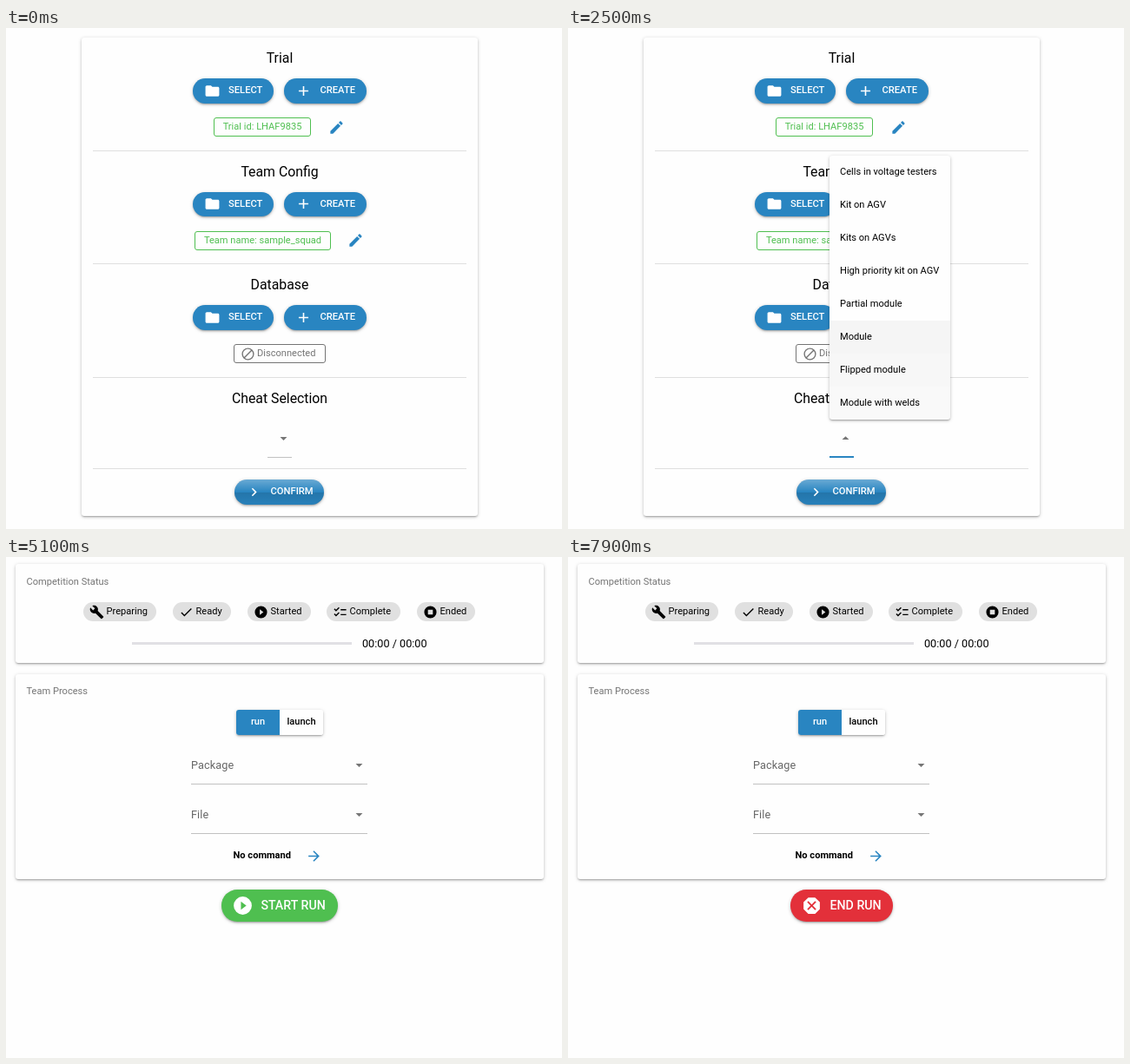
An HTML page for the animation above (8 s loop, 640x577 px).

```html
<!DOCTYPE html>
<html lang="en">
<head>
<meta charset="utf-8">
<title>Trial setup</title>
<style>
html, body { margin: 0; width: 100%; height: 100%; overflow: hidden; background: #fefefe; }
body { font: 11.08px/20px Roboto, sans-serif; color: #000; }
section, div, span, svg { position: absolute; box-sizing: border-box; }
section { left: 0; top: 0; width: 640px; height: 577px; }
span { white-space: pre; }
svg { fill-rule: evenodd; }
.raised { box-shadow: 0 1px 4px rgba(0,0,0,.2), 0 1.6px 1.6px rgba(0,0,0,.14), 0 2.4px .8px -1.6px rgba(0,0,0,.12); }
</style>
</head>
<body>
<script>
const BLUE = '#2985c1', GREEN = '#4fbf50', RED = '#e3303a', GREY = '#757575';
const disc = 'M12 2a10 10 0 1 0 0 20 10 10 0 0 0 0-20z';
const tick = y => `M5.54 ${y}L2 ${y - 3.54}l1.41-1.41 2.12 2.12 4.24-4.24 1.41 1.41z`;
const icons = {
  folder: 'M10 4H4c-1.1 0-2 .9-2 2v12c0 1.1.9 2 2 2h16c1.1 0 2-.9 2-2V8c0-1.1-.9-2-2-2h-8z',
  plus: 'M19 13h-6v6h-2v-6H5v-2h6V5h2v6h6z',
  pencil: 'M3 17.25V21h3.75L17.81 9.94l-3.75-3.75zM20.71 7.04c.39-.39.39-1.02 0-1.41l-2.34-2.34c-.39-.39-1.02-.39-1.41 0l-1.83 1.83 3.75 3.75z',
  blocked: disc + 'M4 12c0-4.42 3.58-8 8-8 1.85 0 3.55.63 4.9 1.69L5.69 16.9C4.63 15.55 4 13.85 4 12zm8 8c-1.85 0-3.55-.63-4.9-1.69L18.31 7.1C19.37 8.45 20 10.15 20 12c0 4.42-3.58 8-8 8z',
  drop: 'M7 10l5 5 5-5z',
  cancel: disc + 'M17 15.59L15.59 17 12 13.41 8.41 17 7 15.59 10.59 12 7 8.41 8.41 7 12 10.59 15.59 7 17 8.41 13.41 12z',
  chevron: 'M10 6L8.59 7.41 13.17 12l-4.58 4.59L10 18l6-6z',
  wrench: 'M22.7 19l-9.1-9.1c.9-2.3.4-5-1.5-6.9-2-2-5-2.4-7.4-1.3L9 6 6 9 1.6 4.7C.4 7.1.9 10.1 2.9 12.1c1.9 1.9 4.6 2.4 6.9 1.5l9.1 9.1c.4.4 1 .4 1.4 0l2.3-2.3c.5-.4.5-1.1.1-1.4z',
  check: 'M9 16.17L4.83 12l-1.42 1.41L9 19 21 7l-1.41-1.41z',
  play: disc + 'M10 16.5v-9l6 4.5z',
  list: 'M22 7h-9v2h9zM22 15h-9v2h9z' + tick(11) + tick(19),
  stop: disc + 'M8 8h8v8H8z',
  arrow: 'M12 4l-1.41 1.41L16.17 11H4v2h12.17l-5.58 5.59L12 20l8-8z',
  octagon: 'M15.73 3H8.27L3 8.27v7.46L8.27 21h7.46L21 15.73V8.27zM17 15.74L15.74 17 12 13.26 8.26 17 7 15.74 10.74 12 7 8.26 8.26 7 12 10.74 15.74 7 17 8.26 13.26 12z'
};

// Markup helpers: boxes by top left corner, icons by centre, text by left edge and middle line.
const box = (x, y, w, h, style = '', attrs = '') =>
  `<div ${attrs} style="left:${x}px;top:${y}px;width:${w}px;height:${h}px;${style}"></div>`;
const icon = (name, x, y, size = 19, color = '#fff', id = '') =>
  `<svg id="${id}" viewBox="0 0 24 24" width="${size}" height="${size}" fill="${color}" style="left:${x - size / 2}px;top:${y - size / 2}px"><path d="${icons[name]}"/></svg>`;
const text = (x, y, str, style = '') => `<span style="left:${x}px;top:${y - 10}px;${style}">${str}</span>`;
const centred = (x, y, str, style) => text(x - 150, y, str, `width:300px;text-align:center;${style}`);
const raised = (x, y, w, h, style) => box(x, y, w, h, style, 'class="raised"');
const card = (x, y, w, h) => raised(x, y, w, h, 'border-radius:3px;background:#fefefe');
const line = (x, y, w, alpha) => box(x, y, w, 1, `background:rgba(0,0,0,${alpha})`);
const group = (id, html) => `<section id="${id}">${html}</section>`;

function pill(x, y, w, h, color, glyph, iconX, label, textX, { size = 11.2, iconSize = 19, hover = '', gloss = '' } = {}) {
  const round = `border-radius:${h / 2}px;`;
  return raised(x, y, w, h, `${round}background:${gloss}${color}`) +
    (hover && box(x, y, w, h, `${round}background:#fff`, `id="${hover}"`)) +
    icon(glyph, iconX, y + h / 2, iconSize) +
    text(textX, y + h / 2 - .3, label, `color:#fff;font-weight:500;font-size:${size}px`);
}
const outline = (x, y, w, color) => box(x, y, w, 22, `border:1px solid ${color};border-radius:3px`);

const heading = (y, str) => centred(315, y, str, 'font-size:15.83px');
const block = (y, title) => heading(y + 35, title) +
  pill(215, y + 58, 93, 28.5, BLUE, 'folder', 237, 'SELECT', 256) +
  pill(320, y + 58, 94.5, 28.5, BLUE, 'plus', 342.5, 'CREATE', 361.5) +
  line(100, Math.round(y + 140.5), 430, .12);

const gloss = 'linear-gradient(rgba(255,255,255,.3),rgba(255,255,255,0) 50%,rgba(0,0,0,.12) 51%,rgba(0,0,0,.04)),';
const options = ['Cells in voltage testers', 'Kit on AGV', 'Kits on AGVs', 'High priority kit on AGV',
  'Partial module', 'Module', 'Flipped module', 'Module with welds'];

const setup = card(87, 11, 456, 551) +
  block(0, 'Trial') + block(130.7, 'Team Config') + block(261.3, 'Database') +
  outline(239, 103, 112, GREEN) + centred(295, 114, 'Trial id: LHAF9835', `color:${GREEN}`) + icon('pencil', 380, 114, 19, BLUE) +
  outline(217, 234, 157, GREEN) + centred(295.5, 244.5, 'Team name: sample_squad', `color:${GREEN}`) + icon('pencil', 402.5, 244.5, 19, BLUE) +
  outline(262, 364, 106, GREY) + icon('blocked', 278, 375.3, 17, GREY) + text(289, 375.3, 'Disconnected', `color:${GREY}`) +
  heading(427, 'Cheat Selection') +
  box(301, 494, 28, 1, '', 'id="rule"') + box(301, 492.8, 28, 1.6, `background:${BLUE}`, 'id="focus"') +
  group('chosen', text(233, 472.5, options[0]) + icon('cancel', 366, 472.5, 19, '#a3a3a3')) +
  icon('drop', 319.5, 472.5, 19, GREY, 'caret') +
  line(100, 507, 430, .12) +
  pill(263, 520, 103, 28.5, BLUE, 'chevron', 285.5, 'CONFIRM', 304.5, { hover: 'confirmHover', gloss }) +
  group('menu', raised(301, 147, 139, 304, 'border-radius:3px;background:#fefefe') +
    options.map((label, i) => box(301, 147 + 38 * i, 139, 38, 'background:#000', 'class="option"') +
      text(313, 165.7 + 38 * i, label)).join(''));

const chip = (x, w, glyph, label) => box(x, 52, w, 22, 'border-radius:11px;background:#e0e0e0') +
  icon(glyph, x + 15, 63.3, 17, '#000') + text(x + 26.5, 63.2, label);
const field = (y, label) => text(213, y, label, 'font-size:12.67px;letter-spacing:.12px;color:#666') +
  icon('drop', 406.5, y, 19, GREY) + line(213, y + 21, 203, .24);
const big = { size: 14.2, iconSize: 25 };

const run = card(11, 8, 608, 114) + card(11, 135, 608, 235.5) +
  text(23.5, 28.5, 'Competition Status', `color:${GREY}`) + text(23.5, 155, 'Team Process', `color:${GREY}`) +
  chip(89, 84, 'wrench', 'Preparing') + chip(192, 67, 'check', 'Ready') + chip(278, 72.5, 'play', 'Started') +
  chip(369, 85, 'list', 'Complete') + chip(473, 67, 'stop', 'Ended') +
  box(145, 98, 253, 3, 'background:#e1e0e4') + text(410, 100, '00:00 / 00:00', 'font-size:12.67px') +
  raised(265, 176, 100, 28.5, `border-radius:3px;background:linear-gradient(90deg,${BLUE} 50%,#fefefe 50%)`) +
  centred(290, 189.5, 'run', 'font-weight:500;color:#fff') + centred(340, 189.5, 'launch', 'font-weight:500') +
  field(239.7, 'Package') + field(296.5, 'File') +
  text(261.5, 343.5, 'No command', 'font-weight:700') + icon('arrow', 354, 344, 19, BLUE) +
  group('start', pill(247.5, 383, 134.5, 36.5, GREEN, 'play', 272.5, 'START RUN', 293.5, { ...big, hover: 'startHover' })) +
  group('end', pill(255.5, 383, 118.5, 36.5, RED, 'octagon', 280.5, 'END RUN', 301.5, { ...big, hover: 'endHover' }));

document.body.innerHTML = group('setup', setup) + group('run', run);

const style = id => document.getElementById(id).style;
const show = (id, on) => { style(id).display = on ? '' : 'none'; };
const optionBoxes = document.querySelectorAll('.option');
const ramp = (t, from, length) => Math.min(1, Math.max(0, (t - from) / length));
const ease = p => 1 - (1 - p) ** 2;
const hover = (t, enter, leave = Infinity) =>
  .15 * ease(ramp(Math.min(t, leave), enter, 400)) * (1 - ease(ramp(t, leave, 400)));

function render(t) {
  const picked = t >= 3700, ended = t >= 7600;
  show('setup', t < 5100);
  show('run', t >= 5100);
  show('chosen', picked);
  show('start', !ended);
  show('end', ended);

  for (const id of ['rule', 'focus']) {
    style(id).left = (picked ? 233 : 301) + 'px';
    style(id).width = (picked ? 163 : 28) + 'px';
  }
  style('rule').background = `rgba(0,0,0,${.24 + .76 * ease(ramp(t, 700, 360))})`;
  style('focus').transform = `scaleX(${ease(ramp(t, 1200, 360))})`;
  style('caret').left = (picked ? 377 : 310) + 'px';
  style('caret').transform = `rotate(${180 * (ease(ramp(t, 1300, 280)) - ease(ramp(t, 3650, 280)))}deg)`;
  style('menu').opacity = ease(ramp(t, 1420, 300)) * (1 - ease(ramp(t, 3650, 300)));

  // The pointer sweeps up the menu and rests on the first option.
  optionBoxes.forEach((el, i) => {
    const enter = 2350 + 50 * (7 - i);
    el.style.opacity = hover(t, enter, i ? enter + 50 : Infinity);
  });
  style('confirmHover').opacity = hover(t, 4600);
  style('startHover').opacity = hover(t, 6950);
  style('endHover').opacity = .15 * (1 - ramp(t, 7600, 300));
}

function tick10(now) {
  render(Math.floor(now % 8000 / 100) * 100);
  requestAnimationFrame(tick10);
}
tick10(performance.now());
</script>
</body>
</html>
```
